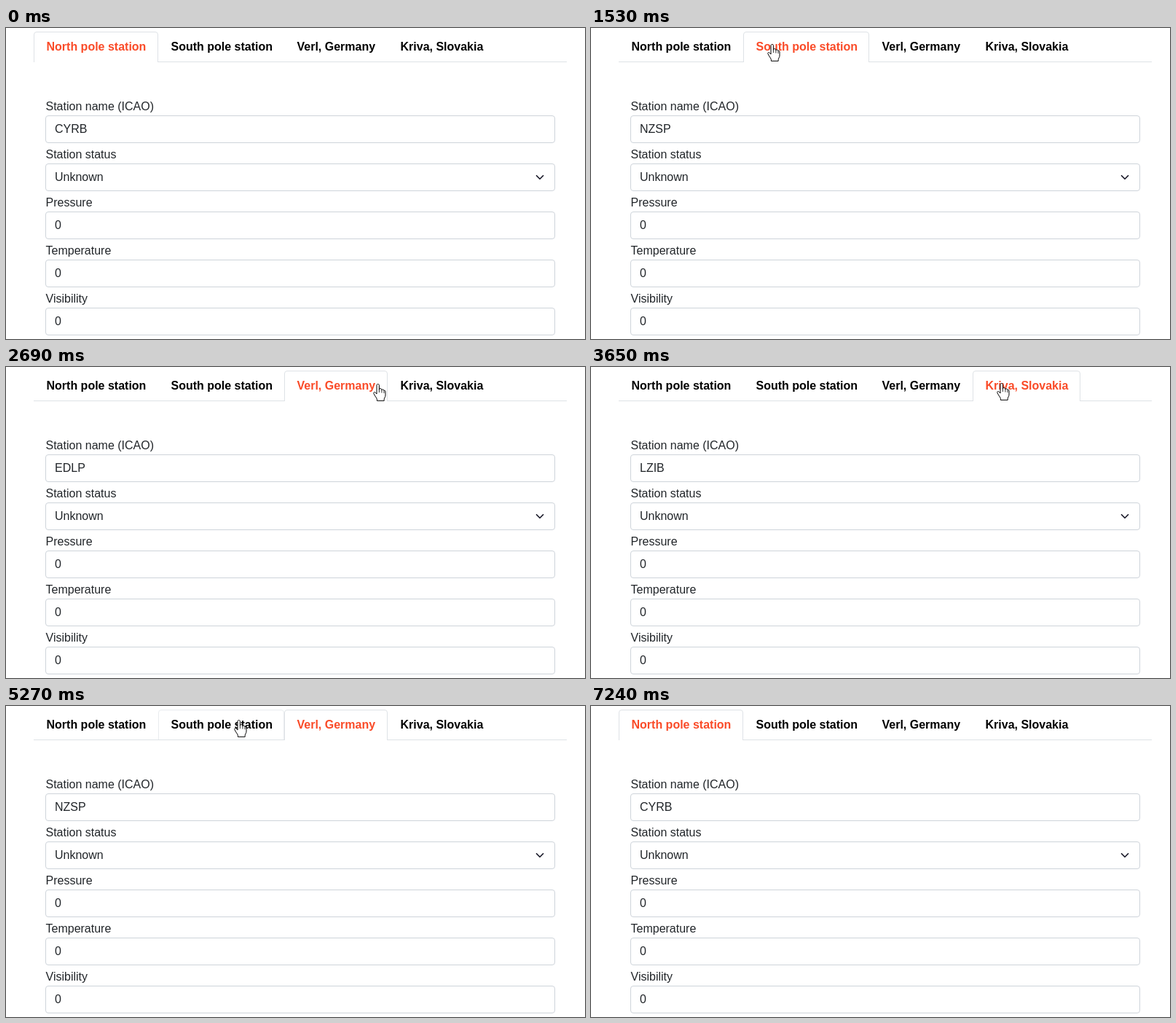
Recreate the animation shown at these times as an HTML page with a canvas. Size 795 by 427 pixels, loop 7.81 s.

```html
<!DOCTYPE html>
<html lang="en">
<head>
<meta charset="utf-8">
<title>Weather stations</title>
<style>
html, body { margin: 0; width: 100%; height: 100%; overflow: hidden; background: #fff; }
canvas { display: block; }
</style>
</head>
<body>
<canvas id="stage" width="795" height="427"></canvas>
<script>
const ctx = document.getElementById('stage').getContext('2d');
const LOOP = 7810;
const FONT = '16px "Liberation Sans", Arial, sans-serif';

// Delays of the page's reactions
const HOVER_LAG = 80, LOAD_LAG = 190, ACTIVE_LAG = 240;

const tabs = [
  { name: 'North pole station', code: 'CYRB', x: 38, end: 209 },
  { name: 'South pole station', code: 'NZSP', x: 209, end: 382 },
  { name: 'Verl, Germany', code: 'EDLP', x: 382, end: 524 },
  { name: 'Kriva, Slovakia', code: 'LZIB', x: 524, end: 672 }
];
const labels = ['Station name (ICAO)', 'Station status', 'Pressure', 'Temperature', 'Visibility'];

// Pointer moves, each ending in a click on a tab
const entry = { x: 725, y: 392 };
const visits = [
  { leave: 300, arrive: 1010, click: 1020, tab: 1, x: 248, y: 22, via: { x: 380, y: -90 } },
  { leave: 1530, arrive: 1980, click: 2000, tab: 2, x: 475, y: 23 },
  { leave: 2570, arrive: 2850, click: 2920, tab: 3, x: 563, y: 22 },
  { leave: 3650, arrive: 3930, click: 4000, tab: 2, x: 470, y: 24 },
  { leave: 4420, arrive: 4750, click: 5070, tab: 1, x: 319, y: 19 },
  { leave: 5520, arrive: 5990, click: 6070, tab: 0, x: 144, y: 18 }
];
const exits = [
  { leave: 6400, arrive: 7000, x: 752, y: 376 },
  { leave: 7000, arrive: 7240, x: 728, y: 428 }
];
const moves = [...visits, ...exits];

// Tab of the last visit whose given moment, plus a delay, has passed
function tabAfter(t, moment, delay, first) {
  const past = visits.filter(v => t >= v[moment] + delay);
  return past.length ? past[past.length - 1].tab : first;
}

function pointerAt(t) {
  if (t < 300 || t >= 7240) return null;
  let i = moves.length - 1;
  while (t < moves[i].leave) i--;
  const from = i ? moves[i - 1] : entry, to = moves[i];
  const k = Math.min(1, (t - to.leave) / (to.arrive - to.leave));
  const e = k * k * (3 - 2 * k);
  const along = axis => {
    const mid = to.via ? to.via[axis] : (from[axis] + to[axis]) / 2;
    return Math.round((1 - e) ** 2 * from[axis] + 2 * e * (1 - e) * mid + e * e * to[axis]);
  };
  return { x: along('x'), y: along('y') };
}

function write(str, x, y, color, bold) {
  ctx.font = (bold ? 'bold ' : '') + FONT;
  ctx.fillStyle = color;
  ctx.fillText(str, x, y);
}

function drawForm(code) {
  labels.forEach((label, i) => {
    const y = 120 + i * 66;
    write(label, 54.5, y - 7, '#212529');
    ctx.strokeStyle = '#ced4da';
    ctx.lineWidth = 1;
    ctx.beginPath();
    ctx.roundRect(54.5, y + 0.5, 699, 37, 3.5);
    ctx.stroke();
    write(i === 0 ? code : i === 1 ? 'Unknown' : '0', 67, y + 24, '#212529');
  });
  ctx.strokeStyle = '#1b1b2a';
  ctx.lineWidth = 1.7;
  ctx.lineCap = ctx.lineJoin = 'round';
  ctx.beginPath();
  ctx.moveTo(728.5, 202.75);
  ctx.lineTo(733, 207.25);
  ctx.lineTo(737.5, 202.75);
  ctx.stroke();
}

function outline(tab, color) {
  const l = tab.x + 0.5, r = tab.end - 0.5;
  ctx.strokeStyle = color;
  ctx.lineWidth = 1;
  ctx.lineCap = 'butt';
  ctx.beginPath();
  ctx.moveTo(l, 46);
  ctx.arcTo(l, 5.5, l + 4, 5.5, 3.5);
  ctx.arcTo(r, 5.5, r, 10, 3.5);
  ctx.lineTo(r, 46);
  ctx.stroke();
}

function drawTabs(current, over) {
  ctx.fillStyle = '#dee2e6';
  ctx.fillRect(38, 46, 732, 1);
  if (over >= 0 && over !== current) outline(tabs[over], '#e9ecef');
  const tab = tabs[current];
  ctx.fillStyle = '#fff';
  ctx.fillRect(tab.x + 1, 46, tab.end - tab.x - 2, 1);
  outline(tab, '#dee2e6');
  tabs.forEach((item, i) => write(item.name, item.x + 17.5, 31, i === current ? '#fa4b28' : '#000', true));
}

function drawClick(p) {
  ctx.globalCompositeOperation = 'multiply';
  ctx.fillStyle = '#fff766';
  ctx.beginPath();
  ctx.arc(p.x - 1, p.y, 12, 0, Math.PI * 2);
  ctx.fill();
  ctx.globalCompositeOperation = 'source-over';
}

const arrow = new Path2D('M.5 .5V16.5L4.2 13 6.7 18.5 9 17.5 6.6 12H11.5Z');
const hand = new Path2D('M-1 2.2C-1-.1 2.4-.1 2.4 2.2V8.2C2.4 7 3 6.6 4 6.6' +
  'C5.4 6.6 5.9 7.4 5.9 8.7C6.4 7.4 9 7.4 9 9.7C9.6 8.6 11 9.2 11 11V16' +
  'C11 18.4 9.2 19.5 9.2 21.5V23.3H-.6V21.5C-.8 19.6-3.8 16.6-5 13.6C-5.9 11.6-3.7 10.8-2.6 12.2L-1 14Z');
const creases = new Path2D('M2.4 8V12M5.9 8.7V12.5M9 9.8V13');

function drawPointer(p) {
  const onTab = p.x >= 38 && p.x < 672 && p.y >= 5 && p.y < 47;
  const shape = onTab ? hand : arrow;
  ctx.save();
  ctx.translate(p.x, p.y);
  ctx.fillStyle = '#fff';
  ctx.strokeStyle = '#000';
  ctx.lineWidth = 1;
  ctx.lineJoin = onTab ? 'round' : 'miter';
  ctx.fill(shape);
  ctx.stroke(shape);
  if (onTab) {
    ctx.lineWidth = 0.8;
    ctx.stroke(creases);
  }
  ctx.restore();
}

function draw(t) {
  ctx.fillStyle = '#fff';
  ctx.fillRect(0, 0, 795, 427);
  drawForm(tabs[tabAfter(t, 'click', LOAD_LAG, 0)].code);
  drawTabs(tabAfter(t, 'click', ACTIVE_LAG, 0), t < 6400 ? tabAfter(t, 'arrive', HOVER_LAG, -1) : -1);
  const p = pointerAt(t);
  if (!p) return;
  if (visits.some(v => t >= v.click && t < v.click + LOAD_LAG)) drawClick(p);
  drawPointer(p);
}

const begin = performance.now();
function tick() {
  draw((performance.now() - begin) % LOOP);
  requestAnimationFrame(tick);
}
tick();
</script>
</body>
</html>
```
